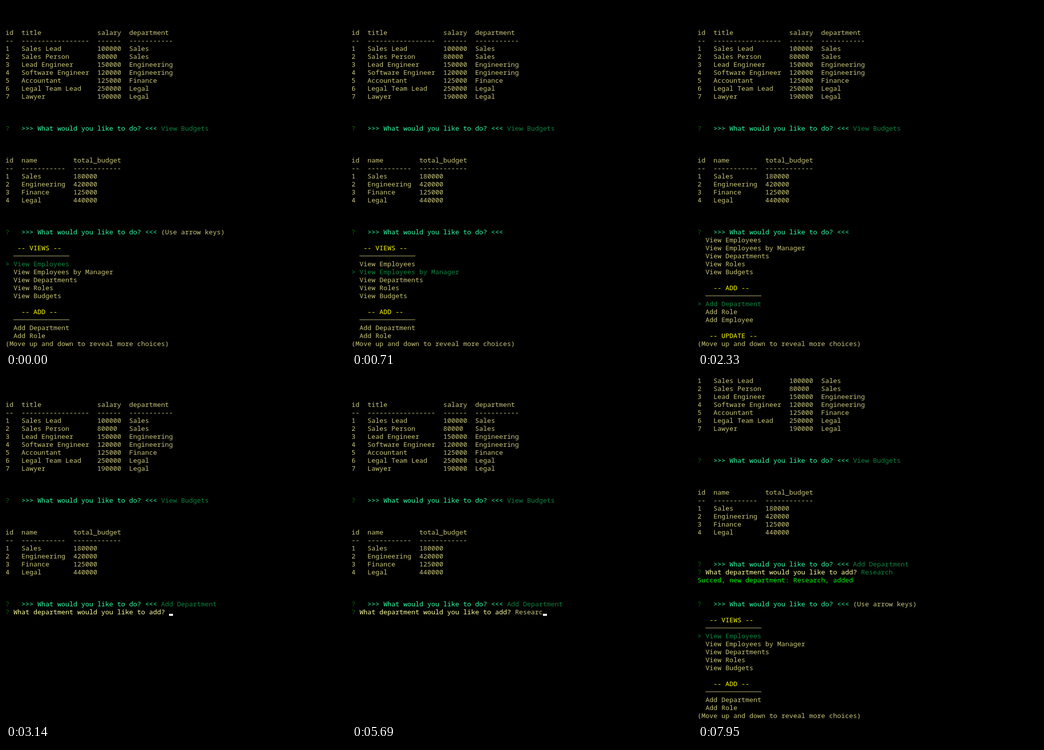
An HTML page for the animation above (8000 ms loop, 682 px wide and 690 px high).

```html
<!DOCTYPE html>
<html lang="en">
<head>
<meta charset="utf-8">
<title>Terminal</title>
<style>
  html, body { margin: 0; width: 100%; height: 100%; overflow: hidden; background: #000; }
  pre {
    position: absolute; left: -1px; top: -3px; margin: 0;
    font: 13.3333px/16px "Noto Sans Mono", "DejaVu Sans Mono", monospace;
    color: #c8c47c;
  }
  i { font-style: normal; }
  .mark { color: #0c6c00; }
  .ask { color: #30ffa8; }
  .pick { color: #0c8440; }
  .head { color: #ffff00; }
  .input { color: #ffffa0; }
  .ok { color: #00f408; }
  #cursor { position: absolute; width: 8px; height: 4px; background: #fff; }
</style>
</head>
<body>
<pre id="screen"></pre>
<div id="cursor"></div>
<script>
const LOOP = 8000;
const screen = document.getElementById('screen');
const cursor = document.getElementById('cursor');
const paint = (kind, text) => `<i class="${kind}">${text}</i>`;

const prompt = answer => paint('mark', '?') + '   ' +
  paint('ask', '>>> What would you like to do? &lt;&lt;&lt;') + ' ' + answer;
const question = answer => paint('mark', '?') + ' ' +
  paint('input', 'What department would you like to add?') + ' ' + answer;

const table = (widths, rows) => {
  const line = cells => cells.map((c, i) => c.padEnd(widths[i])).join('  ');
  const [head, ...body] = rows.map(r => r.split('|'));
  return [head, widths.map(w => '-'.repeat(w)), ...body].map(line);
};

const log = [
  '', '', '',
  ...table([2, 17, 6, 11], [
    'id|title|salary|department',
    '1|Sales Lead|100000|Sales',
    '2|Sales Person|80000|Sales',
    '3|Lead Engineer|150000|Engineering',
    '4|Software Engineer|120000|Engineering',
    '5|Accountant|125000|Finance',
    '6|Legal Team Lead|250000|Legal',
    '7|Lawyer|190000|Legal',
  ]),
  '', '', '',
  prompt(paint('pick', 'View Budgets')),
  '', '', '',
  ...table([2, 11, 12], [
    'id|name|total_budget',
    '1|Sales|180000',
    '2|Engineering|420000',
    '3|Finance|125000',
    '4|Legal|440000',
  ]),
  '', '', '',
];

const rule = '─'.repeat(14);
const title = (pad, name) => paint('head', ' '.repeat(pad) + `-- ${name} --`);
const options = [
  '', title(3, 'VIEWS'), rule,
  'View Employees', 'View Employees by Manager', 'View Departments', 'View Roles', 'View Budgets',
  '', title(4, 'ADD'), rule,
  'Add Department', 'Add Role', 'Add Employee',
  '', title(3, 'UPDATE'),
];

// Thirteen option lines are visible, starting at line `top`.
const menu = (active, top = 0) => [
  ...options.map((o, i) =>
    i === active ? paint('pick', '> ' + o) : o.startsWith('<') ? o : '  ' + o
  ).slice(top, top + 13),
  '(Move up and down to reveal more choices)',
];

const hint = '(Use arrow keys)';
const moves = [500, 960, 1350, 1690];
const SCROLL = 2160, ENTER = 3140, SUBMIT = 7390, DONE = 7560;
const word = 'Research';
const keys = [4330, 4710, 4920, 5140, 5310, 5480, 5690, 5860];
const BLINK = 535;
const passed = (times, t) => times.filter(x => x <= t).length;

// The blink timer runs freely; every key press turns the cursor back on.
function cursorOn(t) {
  const last = Math.max(ENTER, ...keys.filter(k => k <= t));
  const ticks = x => Math.floor((x - 3390) / BLINK);
  return t >= SUBMIT || (ticks(t) - ticks(last)) % 2 === 0;
}

function view(t) {
  if (t < ENTER) {
    const list = t < SCROLL ? menu(3 + passed(moves, t)) : menu(11, 3);
    return { lines: [...log, prompt(t < moves[0] ? hint : ''), ...list] };
  }
  const sent = t >= SUBMIT;
  const typed = word.slice(0, passed(keys, t));
  const lines = [
    ...log,
    prompt(paint('pick', 'Add Department')),
    question(sent ? paint('pick', word) : typed),
  ];
  if (t >= DONE) {
    lines.push(paint('ok', `Succed, new department: ${word}, added`), '', '', prompt(hint), ...menu(3));
    return { lines: lines.slice(5) };
  }
  const at = sent ? [0, 30] : [41 + typed.length, 29];
  return { lines, at: cursorOn(t) && at };
}

let shown = '';
function draw(now) {
  const { lines, at } = view(now % LOOP);
  const html = lines.join('\n');
  // A leading newline would be dropped by some parsers, so keep a space there.
  if (html !== shown) screen.innerHTML = ' ' + (shown = html).replace(/^(?=[^\n])/, '\u200b').replace(/^\u200b/, '\b').replace('\b', '');
  if (lines[0]) screen.firstChild.data = screen.firstChild.data.replace(/^ /, '');
  cursor.hidden = !at;
  if (at) {
    cursor.style.left = at[0] * 8 - 1 + 'px';
    cursor.style.top = at[1] * 16 + 9 + 'px';
  }
}

const start = performance.now();
function frame() {
  draw(performance.now() - start);
  requestAnimationFrame(frame);
}
frame();
</script>
</body>
</html>
```
